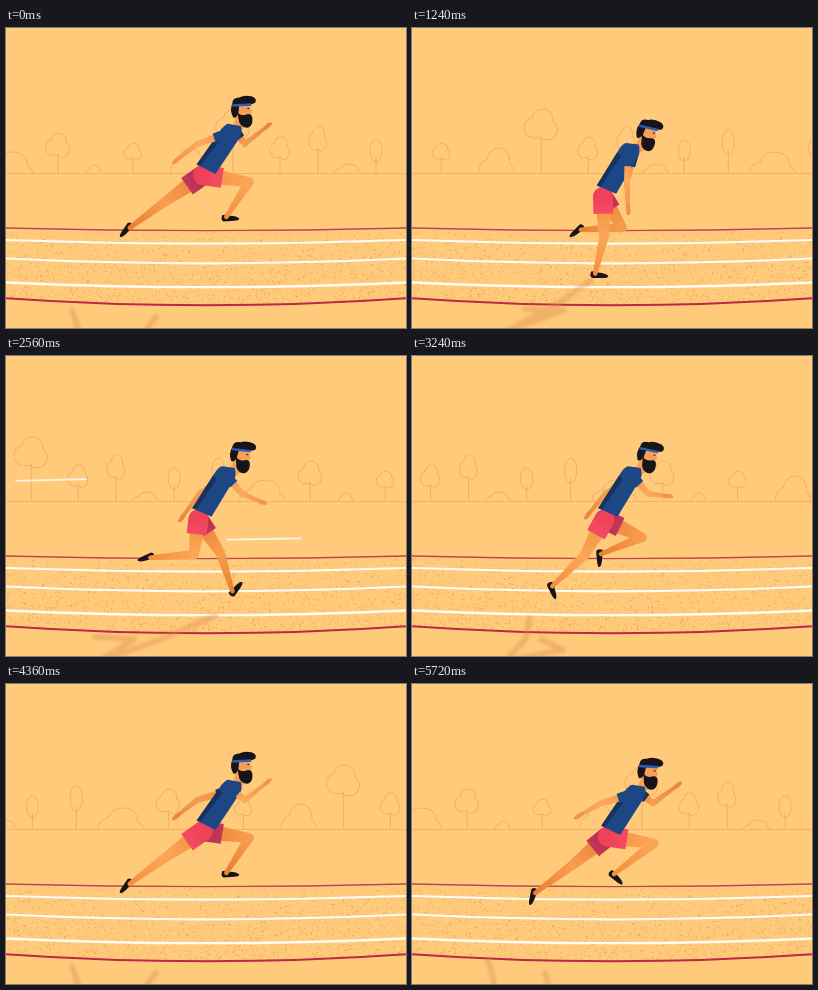
An HTML page with a canvas for the animation above (5.76 s loop, 400 px wide and 300 px high).

```html
<!DOCTYPE html>
<html lang="en">
<head>
<meta charset="utf-8">
<title>Runner</title>
<style>
html, body { margin: 0; width: 100%; height: 100%; overflow: hidden; background: #ffcb7b; }
canvas { display: block; width: 400px; height: 300px; }
</style>
</head>
<body>
<canvas id="stage" width="400" height="300"></canvas>
<script>
const ctx = document.getElementById('stage').getContext('2d');
const LOOP = 5760, TICK = 40, HOLD = 80;
const SKY = '#ffcb7b', INK = '#17141c', BLUE = '#1d4685', NAVY = '#17325f';
const HORIZON = 145, SCENERY = 454, TRACK = 410, GROUND = 250;

// x, half width, top, bottom; a bottom below the horizon makes a bush
const plants = [
  [5, 23, 124, 160], [52, 12, 105, 131], [88, 8, 137, 152], [127, 9, 115, 133],
  [183, 18, 120, 162], [227, 17, 81, 114], [274, 10, 109, 133], [312, 9, 98, 125],
  [342, 14, 136, 154], [370, 6, 112, 133], [414, 6, 102, 127]
];

let seed = 7;
const rand = () => (seed = (seed * 16807) % 2147483647) / 2147483647;
const specks = Array.from({ length: 1900 }, () =>
  [rand() * TRACK, Math.pow(rand(), 0.75), 0.1 + rand() * 0.4]);
const wrap = (v, n) => ((v % n) + n) % n;

// Sum of harmonics, each a [cosine, sine] pair, with one turn per twelve steps
const wave = (step, mean, ...pairs) => pairs.reduce((sum, [c, s], i) => {
  const a = step * (i + 1) * Math.PI / 6;
  return sum + c * Math.cos(a) + s * Math.sin(a);
}, mean);
const bounce = (step, mean, c, s = 0) => wave(step, mean, [0, 0], [c, s]);
const mix = (p, q, f) => [p[0] + (q[0] - p[0]) * f, p[1] + (q[1] - p[1]) * f];
const angle = (p, q) => Math.atan2(q[1] - p[1], q[0] - p[0]);

const hipAt = s => [bounce(s, 194, 3), bounce(s, 158, -11)];
const shoulderAt = s => [bounce(s, 221, 4), bounce(s, 112, -9.5)];
const headAt = s => [bounce(s, 236.7, 0.6, -0.5), bounce(s, 95, -11.5)];

function legAt(s) {
  const rise = hipAt(s)[1];
  const knee = [
    wave(s, 201, [42, -9]),
    rise + wave(s, 26, [-9.9, 4.7], [-9.1, 4.2])
  ];
  const ankle = [
    wave(s, 174, [54, 9.7], [-2, 12], [-5.7, 2.5]),
    rise + wave(s, 51, [-3.5, 18.9], [-3.6, 2.5], [-2, -3])
  ];
  const flex = wave(s, -73, [-54, -31]) * Math.PI / 180;
  return { hip: hipAt(s), knee, ankle, foot: angle(knee, ankle) + flex };
}
function armAt(s) {
  const elbow = [
    wave(s, 215, [-30, 0], [0, 0], [6.3, 0]),
    wave(s, 130.5, [0, 0], [-18.5, 0], [0, 0], [4, 0])
  ];
  const hand = [
    wave(s, 216, [-58.4, 0], [0, 0], [11.8, 0]),
    wave(s, 140, [17.8, -1], [-33.4, 2.7], [0, 0], [8.6, 0])
  ];
  return { elbow, hand };
}

function stroke(color, width) {
  ctx.strokeStyle = color;
  ctx.lineWidth = width;
  ctx.stroke();
}
function line(x1, y1, x2, y2, color, width) {
  ctx.beginPath();
  ctx.moveTo(x1, y1);
  ctx.lineTo(x2, y2);
  stroke(color, width);
}
function shape(path, color) {
  ctx.fillStyle = color;
  ctx.fill(new Path2D(path));
}
function local([x, y], turn, draw) {
  ctx.save();
  ctx.translate(x, y);
  ctx.rotate(turn);
  draw();
  ctx.restore();
}
// Limb segment from p to q, narrowing from width a to b; flat cuts the end straight
function taper(p, q, a, b, from, to = from, flat = false) {
  const ang = angle(p, q), r = Math.PI / 2;
  const fill = ctx.createLinearGradient(...p, ...q);
  fill.addColorStop(0, from);
  fill.addColorStop(1, to);
  ctx.beginPath();
  ctx.arc(...p, a / 2, ang + r, ang - r);
  if (flat) {
    const dx = -Math.sin(ang) * b / 2, dy = Math.cos(ang) * b / 2;
    ctx.lineTo(q[0] - dx, q[1] - dy);
    ctx.lineTo(q[0] + dx, q[1] + dy);
  } else {
    ctx.arc(...q, b / 2, ang - r, ang + r);
  }
  ctx.fillStyle = fill;
  ctx.fill();
}

// A slim crown is one oval, a wider one is three overlapping lobes
function drawPlant(x, [, w, top, bottom]) {
  const h = (bottom - top) / 2, lobes = w < 7 ? 1 : 3;
  const spread = lobes > 1 ? 0.38 : 0;
  const each = (grow, paint) => {
    for (let i = 0; i < lobes; i++) {
      const a = i * 2 * Math.PI / 3 - 1.4, r = 1 - spread;
      ctx.beginPath();
      ctx.ellipse(x + Math.cos(a) * w * spread * 1.1, top + h + Math.sin(a) * h * spread,
        w * r + grow, h * r + grow, 0, 0, 7);
      paint();
    }
  };
  each(0, () => stroke('#f2af68', 1.2));
  each(-0.4, () => { ctx.fillStyle = SKY; ctx.fill(); });
  if (bottom < HORIZON) line(x, HORIZON, x, bottom - h * 0.4, '#f0ad66', 1);
}
function drawScenery(t) {
  ctx.save();
  ctx.beginPath();
  ctx.rect(0, 0, 400, HORIZON);
  ctx.clip();
  for (const p of plants) {
    drawPlant(wrap(p[0] - t / LOOP * SCENERY + 27, SCENERY) - 27, p);
  }
  ctx.restore();
  line(0, HORIZON + 0.5, 400, HORIZON + 0.5, '#f3b069', 1);
}

function arc(y, drop, color, width) {
  ctx.beginPath();
  ctx.moveTo(0, y);
  ctx.quadraticCurveTo(200, y + 2 * drop, 400, y);
  stroke(color, width);
}
function drawTrack(t) {
  for (const [x0, d, alpha] of specks) {
    const x = wrap(x0 - t / LOOP * 8 * TRACK, TRACK);
    const sag = (2.5 + d * 4.5) * (1 - ((x - 200) / 200) ** 2);
    ctx.fillStyle = `rgba(184,102,48,${alpha})`;
    ctx.fillRect(x, 201 + d * 69 + sag, 1, 1);
  }
  arc(200, 2.6, '#bf4450', 1.4);
  arc(212, 3.6, '#fffdf6', 2.1);
  arc(230.5, 4.8, '#fffdf6', 2.2);
  arc(254.5, 4.7, '#fffdf6', 2.3);
  arc(270.2, 7, '#bd2848', 2);
}

// Legs cast down and to the left, further away the higher they are
function drawShadow(...legs) {
  const cast = ([x, y]) => {
    const h = Math.max(0, GROUND - y);
    return [x - 1.15 * h, GROUND + 0.64 * h];
  };
  ctx.save();
  ctx.filter = 'blur(1.5px)';
  ctx.lineCap = ctx.lineJoin = 'round';
  ctx.beginPath();
  for (const { hip, knee, ankle } of legs) {
    ctx.moveTo(...cast(ankle));
    ctx.lineTo(...cast(knee));
    ctx.lineTo(...cast(hip));
  }
  stroke('rgba(218,135,82,.38)', 6);
  ctx.restore();
}

function drawLeg({ hip, knee, ankle, foot }, near) {
  const lit = near ? '#fba657' : '#f79d4e', dark = near ? '#f3903f' : '#ea8034';
  local(ankle, foot, () =>
    shape('M-4-2Q0-3 3-1Q12 0 13 3Q12 4.5 8 4.5L-3 4.5Q-6 3-4-2Z', INK));
  taper(knee, ankle, 9.5, 4.5, lit, dark);
  taper(hip, knee, 17, 9.5, dark, lit);
  taper(hip, mix(hip, knee, 0.42), 20, 20,
    near ? '#f0415a' : '#b52d52', near ? '#f34c63' : '#c43758', true);
}
function drawArm(shoulder, { elbow, hand }, near) {
  const lit = near ? '#fbaa5c' : '#f49e52', dark = near ? '#f39548' : '#ea873c';
  taper(shoulder, elbow, 8, 6, dark, lit);
  taper(elbow, hand, 6, 3, lit, dark);
  local(hand, angle(elbow, hand), () => shape('M-5-2L1-2.5L4-1L4 1L-1 2L-5 2Z', dark));
  taper(shoulder, mix(shoulder, elbow, 0.5), 11, 9.5, near ? BLUE : NAVY, undefined, true);
}
function drawShirt(shoulder, hip) {
  local(shoulder, angle(shoulder, hip), () => {
    shape('M-9-6Q-4-12 6-11L45-10L47 11L8 9Q-4 9-5 4Z', BLUE);
    shape('M10 4L46 7L47 11L8 9Z', NAVY);
  });
}
function drawHead(at, tilt) {
  local(at, tilt, () => {
    shape('M-8-9L7-9L7-3L9 0L7 3L5 11L-2 19L-11 17L-8 8Z', '#f6a056');
    shape('M-10 6Q-14-1-11-8Q-11-14-4-14Q1-17 9-15Q14-13 12-9Q8-6-4-7L-5 2Q-7 7-10 6Z', INK);
    shape('M-6 1Q-2 5 3 3Q8 1 9 6Q10 14 5 16Q-1 17-4 11Z', INK);
    line(-11, -6, 8, -7, '#2b5fb4', 2.4);
    line(4, -3, 6, -3, INK, 1);
  });
}
function drawRunner(t) {
  const step = Math.floor(t / HOLD);
  const near = legAt(step), far = legAt(step + 6);
  const shoulder = shoulderAt(step), [x, y] = shoulder;
  drawShadow(near, far);
  drawArm([x + 5, y + 2], armAt(step + 6), false);
  drawLeg(far, false);
  drawLeg(near, true);
  drawHead(headAt(step), bounce(step, 0.14, -0.14, -0.06));
  drawShirt(shoulder, near.hip);
  drawArm([x, y + 2], armAt(step), true);
}

// Wind lines: time at which the centre sits at x, then x, y, length, slope
const winds = [[720, 63, 169.5, 78, 1], [2560, 45, 124, 71, -0.8], [2560, 258, 183, 74, -0.6]];
function drawWind(t) {
  for (const [at, x0, y, length, slope] of winds) {
    const x = x0 - (t - at) * 0.8, half = length / 2;
    line(x - half, y - slope, x + half, y + slope, '#fff6e2', 1.7);
  }
}

function draw(t) {
  ctx.fillStyle = SKY;
  ctx.fillRect(0, 0, 400, 300);
  drawScenery(t);
  drawTrack(t);
  drawWind(t);
  drawRunner(t);
}

const start = performance.now();
function frame() {
  const t = (performance.now() - start) % LOOP;
  draw(Math.floor(t / TICK) * TICK);
  requestAnimationFrame(frame);
}
frame();
</script>
</body>
</html>
```
